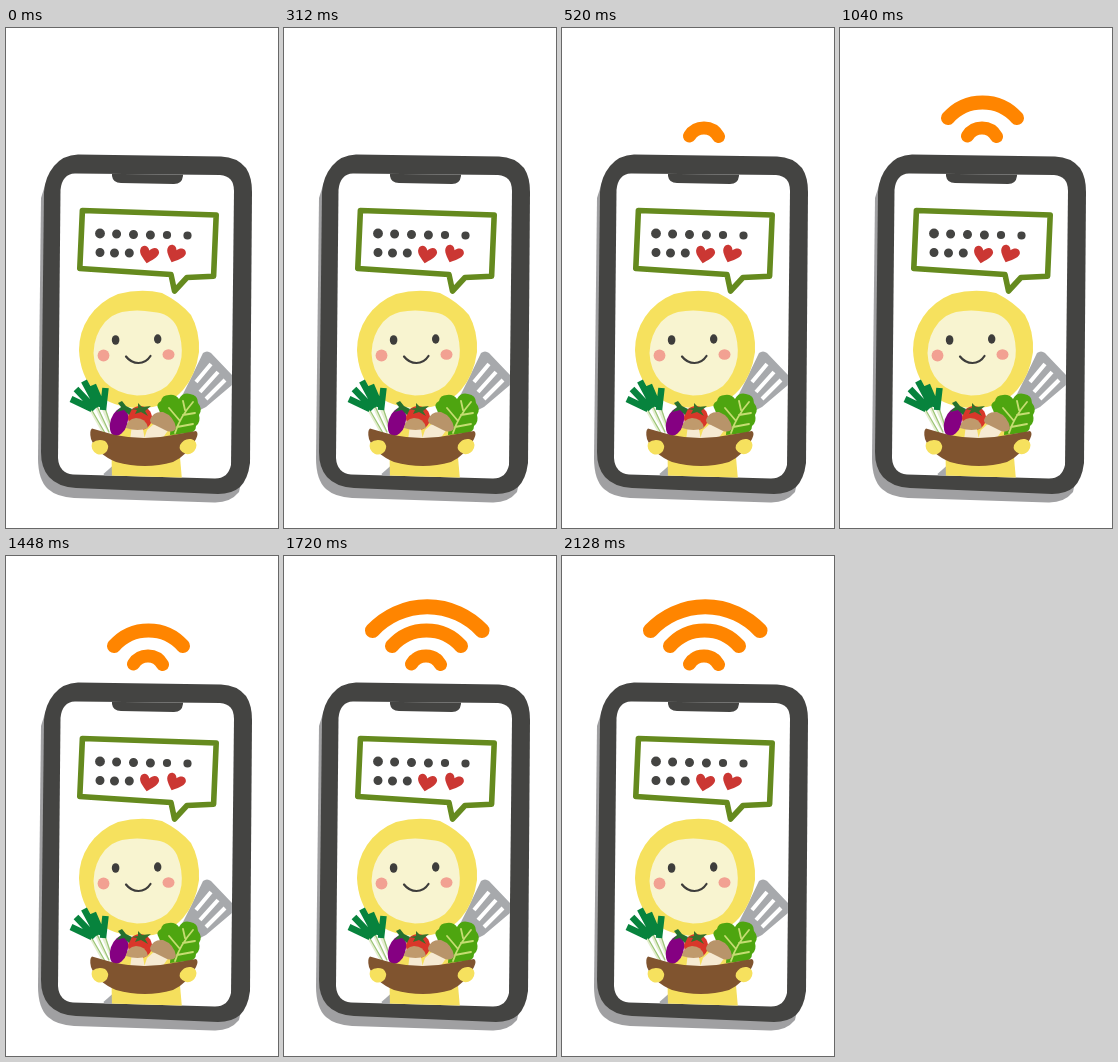
These frames come from a looping animation (272x500 px, 2.4 s). An HTML page:

```html
<!DOCTYPE html>
<html lang="en">
<head>
<meta charset="utf-8">
<title>Phone signal</title>
<style>
  html, body { margin: 0; width: 100%; height: 100%; overflow: hidden; background: #fff; }
  svg { display: block; width: 100%; height: 100%; }
  .line { fill: none; stroke-linecap: round; stroke-linejoin: round; }
  .bar { fill: none; stroke-linecap: butt; }
  .wave { stroke: #ff8500; animation: 2400ms step-end infinite; }
  .near { animation-name: near; }
  .mid { animation-name: mid; }
  .far { animation-name: far; }
  @keyframes near { 0% { visibility: hidden } 21.6667%, 100% { visibility: visible } }
  @keyframes mid { 0% { visibility: hidden } 43.3333%, 100% { visibility: visible } }
  @keyframes far { 0% { visibility: hidden } 71.6667%, 100% { visibility: visible } }
</style>
</head>
<body>
<svg viewBox="0 0 272 500">
  <defs>
    <path id="heart" d="M0 9C-4 5-10 1-9-4C-8-9-2-9 0-4C3-9 9-9 10-4C10 1 4 5 0 9Z"/>
    <clipPath id="screen">
      <path d="M69 145.500L214 147Q228 148 228 163L225 437Q222 450.500 209 450.500L67 446.500Q53 445 52 430L54.500 162Q56 146 69 145.500Z"/>
    </clipPath>
  </defs>

  <g class="line">
    <path class="wave near" stroke-width="13" d="M127.500 108A17 17 0 0 1 156.500 108.500"/>
    <path class="wave mid" stroke-width="14" d="M108 90A46 46 0 0 1 177 90"/>
    <path class="wave far" stroke-width="15" d="M88.500 74.500A75 75 0 0 1 198 74.500"/>
  </g>

  <!-- phone -->
  <path fill="#a0a0a2" d="M68 133L42 148L35 170L32 430Q32 452 42 461Q51 469 68 470L208 474.500Q224 475 233 464L238 440L210 140Z"/>
  <path fill="#444442" d="M72 126.500L215 128.500Q231 129 240 140Q246 149 246 164L244 435Q242 451 234 459Q226 466 212 466L70 460Q52 459 43 449Q35 440 35 424L38 164Q39 149 48 138Q57 127 72 126.500Z"/>

  <g clip-path="url(#screen)">
    <path fill="#fff" d="M50 144H230V453H50Z"/>
    <path fill="#444442" d="M106 144H177V148Q176 156 168 156L115 155Q107 155 106 148Z"/>

    <!-- spatula -->
    <path class="bar" stroke="#a7a9ac" stroke-width="8" d="M100 449L190 370"/>
    <path fill="#a7a9ac" d="M197 325Q201 322 205 325L226 347Q230 351 226 357L200 379L186 386L176 368L185 350Z"/>
    <path class="bar" stroke="#fff" stroke-width="4" d="M205 336L190 354M212 344L194 364M219 352L200 371"/>

    <!-- character -->
    <path fill="#f5df5d" d="M105 395H171L176 452H106Z"/>
    <path fill="#f6e15e" d="M112 266Q135 260 156 265Q174 274 185 287Q194 303 193 324Q190 347 177 362Q161 380 134 380Q106 380 89 364Q74 347 73 322Q73 304 83 289Q94 273 112 266Z"/>
    <path fill="#f8f4d0" d="M116 284Q131 281 147 284Q164 285 171 299Q177 314 175.500 329Q173 346 161 358Q149 367.500 131 367.500Q111 366 99 354Q88 342 87.500 325Q88 307 99 294Q107 286 116 284Z"/>
    <g fill="#3e3d3b">
      <ellipse cx="109.600" cy="312" rx="3.800" ry="4.800"/>
      <ellipse cx="151.700" cy="311" rx="3.700" ry="4.700"/>
    </g>
    <g fill="#f2a192">
      <circle cx="97.500" cy="327.500" r="5.900"/>
      <ellipse cx="162.500" cy="326.500" rx="6" ry="5.300"/>
    </g>
    <path class="line" stroke="#3e3d3b" stroke-width="2.200" d="M120 328.500Q125 335 132.500 335T144.500 328"/>
  </g>

  <!-- speech bubble -->
  <path class="line" stroke="#658a1e" stroke-width="5.600" fill="#fff" d="M76.400 182.500L210.200 187L207.600 248.200L181 249.500L168.500 263L165 246.500L73.800 240.500Z"/>
  <g class="line" stroke="#444442">
    <path stroke-width="9.800" d="M94 205.500h0"/>
    <path stroke-width="9" d="M110.600 206h0M127.500 206.500h0M144.400 207h0M94 224.500h0M108.500 225h0M123.300 225h0"/>
    <path stroke-width="8.200" d="M161 207h0M181.500 207.500h0"/>
  </g>
  <g fill="#cb3733">
    <use href="#heart" transform="translate(142.500 226.500) rotate(12)"/>
    <use href="#heart" transform="translate(169 226) rotate(22)"/>
  </g>

  <!-- leeks -->
  <g class="line">
    <path stroke="#e4eed0" stroke-width="4.500" d="M84 379L101 409M90 376L104 408M96 377L106 406"/>
    <path stroke="#fff" stroke-width="2.500" d="M86 380L102 407M93 378L105 406"/>
    <path stroke="#9bc477" stroke-width="1.200" d="M84 379L99 405M90 376L103 404M98 377L107 404"/>
  </g>
  <path class="bar" stroke="#07833d" stroke-width="6.500" d="M65 371L86 381M70 361L89 381M78 353L92 379M87 357L96 378M99.500 360L97 382"/>

  <!-- lettuce -->
  <path fill="#4ea510" d="M153 382Q149 376 155 373Q156 367 163 367Q169 366 173 371Q177 364 184 366Q192 367 192 375Q197 381 193 387Q195 394 190 398Q190 404 183 405L164 407L165 393Q159 392 160 387Q154 387 153 382Z"/>
  <path class="line" stroke="#c5dd72" stroke-width="1.800" d="M169 405Q174 389 187 374M174 393L163 380M177 387L189 385M171 399L187 396M179 382L177 373"/>

  <!-- tomato, aubergine, mushrooms -->
  <circle cx="134" cy="390" r="12" fill="#d9372a"/>
  <path fill="#35702c" d="M125 381L132 380L132 375L136 379L145 378L139 383L142 388L135 384L129 386L131 382Z"/>
  <ellipse cx="113" cy="394" rx="8.500" ry="14.500" fill="#850082" transform="rotate(18 113 394)"/>
  <path fill="#24702f" d="M112 375L116 373L120 378L126 381L123 387L118 382L110 384L115 379Z"/>
  <path fill="#f6ead2" d="M126 397L136 396L139 412H124Z"/>
  <path fill="#c09a6c" d="M120 400Q121 391 130 390Q140 390 142 400Q132 404 120 400Z"/>
  <path fill="#f6ead2" d="M149 395L163 401L156 411L138 411L141 402Z"/>
  <path fill="#b8946a" d="M144 392Q147 383 157 384Q168 388 170 400Q168 405 161 403L149 397Q144 396 144 392Z"/>

  <!-- bowl and hands -->
  <path fill="#80542f" d="M86 400.500Q98 404 109 407Q139 413 167 407L190 403Q193 405 190 411Q183 426 167 434Q139 442 110 434Q91 426 85 411Q83 403 86 400.500Z"/>
  <path fill="#f6e15e" d="M86 415Q92 410 99 413Q104 417 101 423Q97 428 91 426Q84 422 86 415ZM174 417Q178 410 185 411Q192 413 190 420Q187 427 180 426Q172 423 174 417Z"/>
</svg>
</body>
</html>
```
